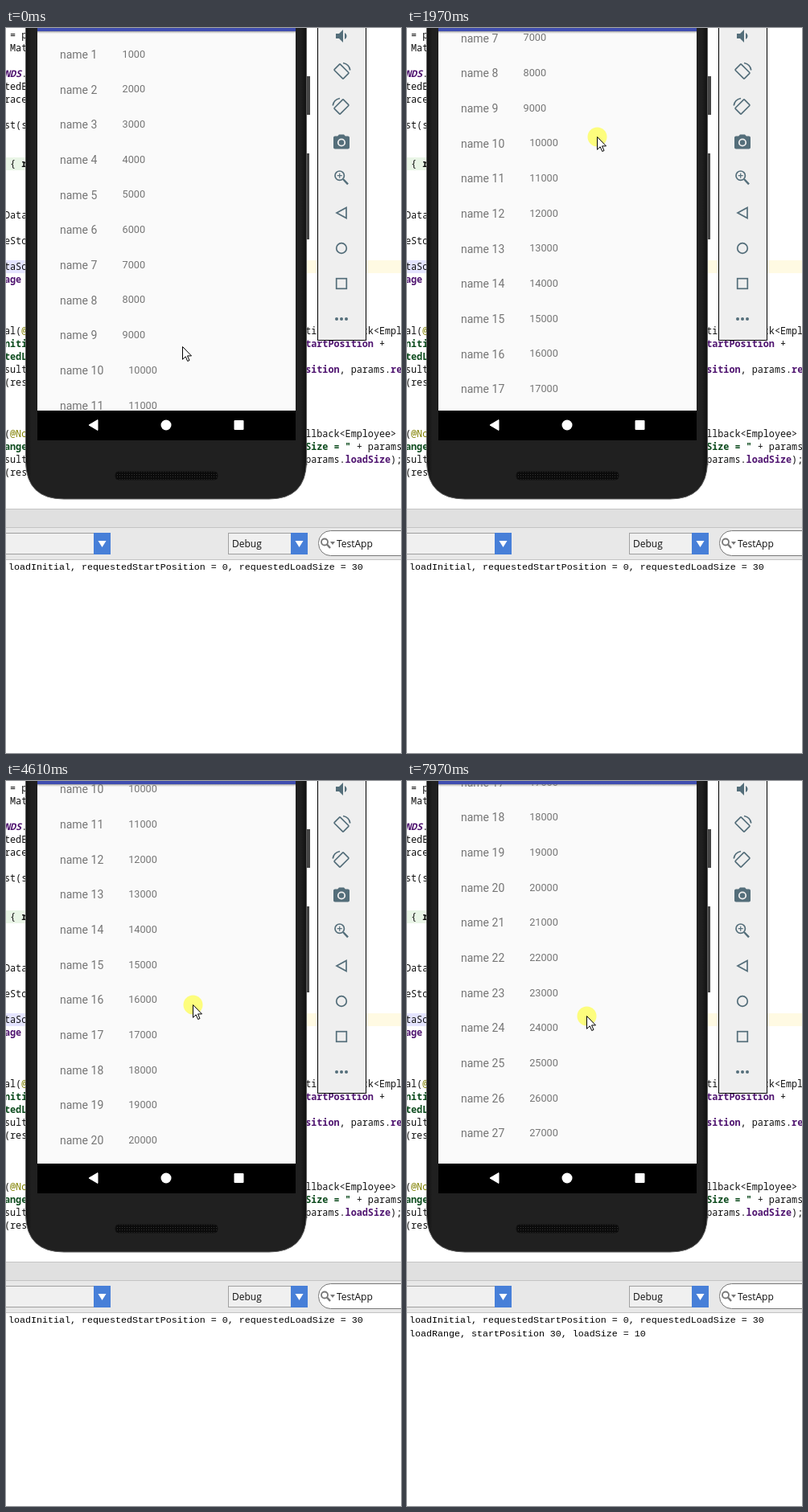
These frames come from a looping animation (491x902 px, 8000 ms). An HTML page:

```html
<!DOCTYPE html>
<html lang="en">
<head>
<meta charset="utf-8">
<title>Paged list demo</title>
<style>
  html, body { margin: 0; width: 100%; height: 100%; overflow: hidden; background: #fff; }
  svg { display: block; }
  text { white-space: pre; }
  .code { font: 11.77px "Noto Sans Mono", monospace; fill: #111; }
  .key { font-weight: 700; fill: #4f1470; }
  .str { font-weight: 700; fill: #0b4a1c; }
  .note { fill: #808000; }
  .ui { font: 12px "Open Sans", sans-serif; fill: #111; }
  .log { font: 11.67px "Liberation Mono", monospace; fill: #000; }
  .name { font: 14px Roboto, sans-serif; fill: #757575; }
  .value { font: 12.7px Roboto, sans-serif; fill: #757575; }
  .line { fill: none; stroke: #546e7a; stroke-width: 1.7; }
  .icon { fill: #546e7a; }
</style>
</head>
<body>
<svg width="491" height="902" viewBox="0 0 491 902">
  <defs>
    <clipPath id="screen"><rect x="39" y="4" width="321" height="472"/></clipPath>
    <linearGradient id="shade" x2="0" y2="1">
      <stop stop-color="#999"/><stop offset="1" stop-color="#fafafa" stop-opacity="0"/>
    </linearGradient>
    <linearGradient id="body">
      <stop stop-color="#111"/><stop offset=".02" stop-color="#202020"/>
      <stop offset=".98" stop-color="#202020"/><stop offset="1" stop-color="#111"/>
    </linearGradient>
    <pattern id="mesh" width="3" height="3" patternUnits="userSpaceOnUse">
      <rect width="3" height="3" fill="#0b0b0b"/><rect width="1" height="1" fill="#333"/>
    </pattern>
    <g id="rotate">
      <rect class="line" x="-5.2" y="-8" width="10.4" height="16" rx="1" transform="rotate(-45)"/>
      <path class="line" d="M2-10.500A11 11 0 0 1 10.800-1.500"/>
    </g>
  </defs>
  <rect width="491" height="902" fill="#fff"/>

  <rect y="161" width="26" height="16" fill="#e9f5e6"/>
  <rect y="289" width="26" height="16" fill="#e4e4ff"/>
  <rect x="370" y="289" width="121" height="16" fill="#fffae3"/>
  <g id="code"></g>

  <path d="M374 60h4v48h-4zM374 156h3v107h-3z" fill="#444"/>
  <path d="M24.500-5V540Q25.500 586 72 586H327Q372.500 586 373.500 540V-5z" fill="url(#body)" stroke="#5a5a5a"/>
  <rect x="136" y="552" width="127" height="10" rx="4" fill="url(#mesh)" stroke="#111"/>
  <rect x="39" width="321" height="476" fill="#fafafa"/>
  <rect x="39" y="4" width="321" height="4" fill="url(#shade)"/>
  <g clip-path="url(#screen)"><g id="rows"></g></g>
  <rect x="39" width="321" height="4" fill="#3f4db0"/>
  <rect x="39" y="476" width="321" height="37" fill="#000"/>
  <path d="M103 494l11-6.500v13zM284 488.500h11v11h-11z" fill="#fff" stroke="#fff" stroke-linejoin="round"/>
  <circle cx="199" cy="494" r="6.500" fill="#fff"/>

  <rect x="387.500" y="-2" width="60" height="390.500" fill="#efefef" stroke="#000"/>
  <path class="icon" transform="translate(406 -2)" d="M4 9v6h4l5 5V4L8 9zm13.500 3c0-1.770-1.020-3.290-2.500-4.030v8.050c1.480-.73 2.500-2.250 2.500-4.020z"/>
  <use href="#rotate" x="417" y="54"/>
  <use href="#rotate" transform="translate(417 98) scale(-1 1)"/>
  <path class="icon" transform="translate(405 130.500)" d="M9 2L7.170 4H4c-1.100 0-2 .9-2 2v12c0 1.100.9 2 2 2h16c1.100 0 2-.9 2-2V6c0-1.100-.9-2-2-2h-3.170L15 2z"/>
  <circle cx="417" cy="142.500" r="4.200" fill="#546e7a" stroke="#efefef" stroke-width="1.800"/>
  <g class="line">
    <circle cx="414.700" cy="183.700" r="5.700"/>
    <path d="M419 188l6 6.300" stroke-width="2.400"/>
    <path d="M411.700 183.700h6M414.700 180.700v6" stroke-width="1.200"/>
    <path d="M411 230l12-6.500v13z"/>
    <circle cx="417" cy="274" r="6.300"/>
    <rect x="410.700" y="311.700" width="12.600" height="12.600"/>
  </g>
  <g class="icon"><circle cx="411" cy="362" r="2"/><circle cx="417" cy="362" r="2"/><circle cx="423" cy="362" r="2"/></g>

  <rect y="598" width="491" height="63" fill="#e8e8e8"/>
  <rect y="598" width="491" height="24" fill="#e0e0e0"/>
  <path d="M0 598.500h491M0 621.500h491M0 661.500h491" stroke="#c4c4c4"/>
  <g fill="#f0f0f0" stroke="#a0a0a0">
    <rect x="-5" y="628.500" width="134.500" height="26"/>
    <rect x="276.500" y="628.500" width="98" height="26"/>
  </g>
  <path d="M109 628h21v27h-21zM354 628h21v27h-21z" fill="#477fd8"/>
  <path d="M114.500 638h10l-5 8zM359.500 638h10l-5 8z" fill="#fff"/>
  <text class="ui" x="281" y="646">Debug</text>
  <rect x="388.500" y="625.500" width="130" height="31" rx="15" fill="#fff" stroke="#777"/>
  <g fill="none" stroke="#777"><circle cx="396" cy="639.500" r="4" stroke-width="1.800"/><path d="M399 642.500l4 4.500" stroke-width="2.400"/></g>
  <path d="M403 639h6l-3 4z" fill="#777"/>
  <text class="ui" x="411" y="646">TestApp</text>
  <text class="log" x="3" y="674">loadInitial, requestedStartPosition = 0, requestedLoadSize = 30</text>
  <text class="log" id="range" x="3" y="691">loadRange, startPosition 30, loadSize = 10</text>

  <g id="pointer">
    <circle id="touch" cx=".5" cy=".5" r="12" fill="#ff0" fill-opacity=".5"/>
    <path d="M.5.5V16.300L4.200 12.800 6.700 18.500 9 17.500 6.500 11.900H11.500z" fill="#fff" stroke="#000" stroke-linejoin="round"/>
  </g>
</svg>
<script>
const LOOP = 8000, ROW = 43.67, LINE = 16, CHAR = 7.06, LOADED = 4680;
const $ = id => document.getElementById(id);

function addText(parent, cls, x, y, content) {
  const el = document.createElementNS("http://www.w3.org/2000/svg", "text");
  el.setAttribute("class", cls);
  el.setAttribute("x", x);
  el.setAttribute("y", y);
  el.innerHTML = content;
  parent.append(el);
}

const span = cls => s => `<tspan class="${cls}">${s}</tspan>`;
const key = span("key"), str = span("str"), note = span("note");

// Places consecutive code lines on the character grid
function addCode(line, column, ...lines) {
  lines.forEach((s, i) => addText($("code"), "code", -2 + column * CHAR, 13 + (line + i) * LINE, s));
}
addCode(0, 1, "= p", "Mat");
addCode(3, 0, `<tspan class="key" font-style="italic">NDS</tspan>.`, "tedE", "race", "", "st(s");
addCode(10, 1, "{ <tspan font-weight='700'>r</tspan>");
addCode(14, 0, "Data", "", "eSto", "", "taSo", key("age"));
addCode(23, 0, "al(" + note("@"), str("niti"), str("tedL"), "sult", "(res");
addCode(31, 0, "(" + note("@No"), str("ange"), "sult", "(res");
addCode(23, 53, "tialCallback&lt;Employee>", key("tartPosition") + " +");
addCode(26, 53, key("sition") + ", params." + key("requested"));
addCode(31, 53, "llback&lt;Employee>", str('Size = "') + " + params", "params." + key("loadSize") + ");");

for (let i = 1; i <= 29; i++) {
  const y = 38 + (i - 1) * ROW;
  addText($("rows"), "name", 67, y, `name ${i}`);
  addText($("rows"), "value", i < 10 ? 144.5 : 152.2, y - 1.2, i * 1000);
}

const linear = t => t;
const speedUp = t => t ** 1.4;
const slowDown = t => 1 - (1 - t) ** 1.4;
const smooth = t => t * t * (3 - 2 * t);

const move = (start, end, steps, x, y, ease = linear) => ({ start, end, steps, x, y, ease });
const rest = move(0, 0, 1, 219, 396);
const moves = [
  move(220, 370, 3, 234, 426),
  move(940, 1730, 11, 234, 143, speedUp),
  move(1800, 2020, 4, 236, 134, slowDown),
  move(2420, 2500, 2, 236, 129),
  move(2740, 3127, 6, 231, 404, smooth),
  move(3205, 3360, 3, 232, 407),
  move(3610, 3990, 6, 232, 340, speedUp),
  move(4250, 4760, 8, 232, 247, speedUp),
  move(5170, 5680, 8, 240, 92, speedUp),
  move(6320, 6320, 1, 240, 85),
  move(6400, 7110, 10, 227, 416, slowDown),
  move(7180, 7180, 1, 227, 423),
  move(7670, 7970, 5, 223, 292, speedUp),
];

// The slop is the distance dragged before the list follows
const touch = (start, end, slop) => ({ start, end, slop });
const touches = [touch(690, 2500, 8.3), touch(3360, 6390, 2.3), touch(7420, LOOP, 9.4)];

// Pointer position, advancing in discrete steps
function pointerAt(t) {
  const i = moves.findLastIndex(m => m.start <= t);
  if (i < 0) return rest;
  const { start, end, steps, x, y, ease } = moves[i], from = moves[i - 1] ?? rest;
  const interval = (end - start) / (steps - 1) || 1;
  const step = Math.min(steps, 1 + Math.floor((t - start + 5) / interval));
  const f = ease(step / steps);
  return { x: from.x + (x - from.x) * f, y: from.y + (y - from.y) * f };
}

function scrollAt(t) {
  return touches.filter(d => d.start <= t).reduce((sum, { start, end, slop }) => {
    const dragged = pointerAt(start).y - pointerAt(Math.min(t, end)).y;
    return sum + Math.max(0, dragged - slop);
  }, 0);
}

function draw() {
  const t = performance.now() % LOOP;
  const { x, y } = pointerAt(t);
  const show = (id, on) => $(id).setAttribute("visibility", on ? "visible" : "hidden");
  $("rows").setAttribute("transform", `translate(0 ${-scrollAt(t)})`);
  $("pointer").setAttribute("transform", `translate(${Math.round(x)} ${Math.round(y)})`);
  show("touch", touches.some(d => t >= d.start && t < d.end));
  show("range", t >= LOADED);
  requestAnimationFrame(draw);
}
draw();
</script>
</body>
</html>
```
